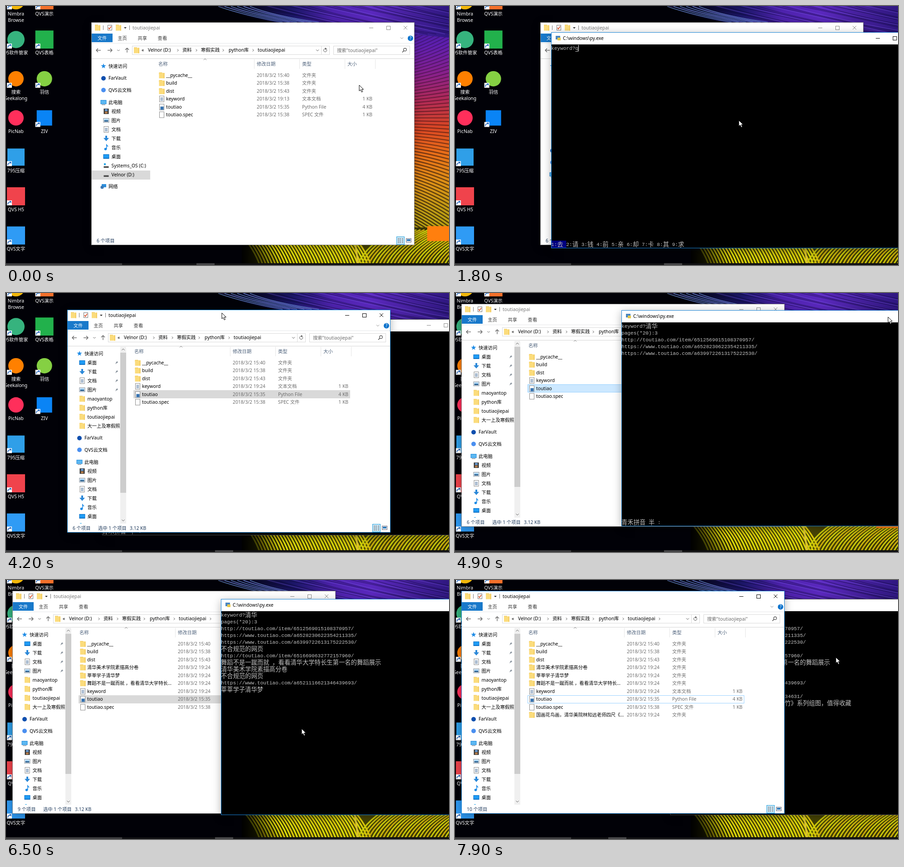
Animation of 977 by 573 pixels, one loop 8000 ms. Source, as an HTML page with a canvas:

```html
<!DOCTYPE html>
<html lang="zh-CN">
<head>
<meta charset="utf-8">
<style>
html, body { margin: 0; width: 100%; height: 100%; overflow: hidden; background: #000 }
canvas { display: block }
</style>
</head>
<body>
<canvas id="stage" width="977" height="573"></canvas>
<script>
const LOOP = 8000, STEP = 100, W = 977, H = 573;
const UI = "10.3px 'Noto Sans','Noto Sans CJK SC','Noto Sans CJK',sans-serif";
const MONO = "11.11px 'Liberation Mono',monospace";
const MONO_CJK = "300 13.33px 'Noto Sans CJK SC','Noto Sans CJK',sans-serif";
const CELL = 20 / 3;
const screen = document.getElementById('stage').getContext('2d');
let g = screen;

// ---------- helpers ----------
function rect(x, y, w, h, color) { g.fillStyle = color; g.fillRect(x, y, w, h); }
function frame(x, y, w, h, color) { g.strokeStyle = color; g.lineWidth = 1; g.strokeRect(x + .5, y + .5, w - 1, h - 1); }
function disc(x, y, r, color) { g.fillStyle = color; g.beginPath(); g.arc(x, y, r, 0, 7); g.fill(); }
function line(color, width, ...p) {
  g.strokeStyle = color; g.lineWidth = width; g.beginPath();
  for (let i = 0; i < p.length; i += 2) g.lineTo(p[i], p[i + 1]);
  g.stroke();
}
function shape(color, ...p) {
  g.fillStyle = color; g.beginPath();
  for (let i = 0; i < p.length; i += 2) g.lineTo(p[i], p[i + 1]);
  g.fill();
}
function curve(color, width, x0, y0, cx, cy, x1, y1) {
  g.strokeStyle = color; g.lineWidth = width; g.beginPath();
  g.moveTo(x0, y0); g.quadraticCurveTo(cx, cy, x1, y1); g.stroke();
}
function text(s, x, y, color = '#000', align = 'left') {
  g.font = UI; g.fillStyle = color; g.textAlign = align; g.fillText(s, x, y + 3.7);
}
function chevron(x, y, dx, dy, color = '#555') {
  if (dx) line(color, 1, x - dx, y - 2.5, x + dx, y, x - dx, y + 2.5);
  else line(color, 1, x - 3, y - dy, x, y + dy, x + 3, y - dy);
}
function gradient(x0, y0, x1, y1, colors) {
  const fill = g.createLinearGradient(x0, y0, x1, y1);
  colors.forEach((c, i) => fill.addColorStop(i / (colors.length - 1), c));
  return fill;
}
// Linear interpolation along [time, x, y] keys
function along(keys, t) {
  const i = keys.findIndex(k => k[0] > t);
  if (i === 0) return keys[0].slice(1);
  if (i < 0) return keys[keys.length - 1].slice(1);
  const [a, b] = [keys[i - 1], keys[i]], u = (t - a[0]) / (b[0] - a[0]);
  return [a[1] + (b[1] - a[1]) * u, a[2] + (b[2] - a[2]) * u];
}

// ---------- desktop ----------
function feathers() {
  // warm plume on the right, its barbs fanning out downwards
  rect(880, 30, 97, 543, gradient(900, 30, 940, H,
    ['#3c1c9c', '#5f1fae', '#86208c', '#b02a56', '#d84624', '#e87018', '#dd9016', '#c09c14', '#b0a410', '#a8a80c']));
  for (let i = 0; i < 90; i++) {
    const y = 20 + i * 6.5, slope = -70 + i * 2;
    curve(`rgba(16,4,10,${.25 + i * .006})`, 1.6 + i * .015, 885, y, 930, y + slope * .3, 985, y + slope);
  }
  // violet sweep at the top
  g.save();
  g.beginPath(); g.moveTo(465, 0); g.quadraticCurveTo(560, 44, 760, 50); g.lineTo(W, 70); g.lineTo(W, 0); g.clip();
  rect(465, 0, 512, 70, gradient(465, 0, W, 0, ['#000', '#070722', '#1c1668', '#4d22ac', '#5a28be', '#45209c', '#2f1780']));
  for (let i = 0; i < 26; i++)
    curve(i % 3 ? 'rgba(6,3,40,.4)' : 'rgba(120,90,230,.35)', 1.5, 455 + i * 18, -4, 560 + i * 18, 18 + i % 4 * 4, 740 + i * 19, 62);
  for (let i = 0; i < 6; i++) curve('rgba(120,160,240,.7)', 1.4, 468 + i * 14, 1, 530 + i * 12, 22, 610 + i * 16, 36);
  g.restore();
  // yellow plume at the bottom
  g.save();
  g.beginPath(); g.rect(520, 490, 457, 83); g.clip();
  rect(520, 490, 457, 83, gradient(520, 0, W, 0, ['#000', '#3a3a02', '#4a4804', '#403c04', '#383404']));
  for (let i = 0; i < 36; i++)
    curve(`hsl(${60 - i % 3 * 3},92%,${Math.min(45, 14 + i * 4)}%)`, 3.4, 512 + i * 7, 500, 548 + i * 7, 535, 562 + i * 7, 580);
  for (let i = 0; i < 34; i++)
    curve(`hsl(${60 - i % 4 * 3},90%,41%)`, 3.2, 772 + i * 8, 580, 790 + i * 8, 530, 860 + i * 9, 495);
  curve('#d8c030', 4, 766, 500, 773, 540, 777, 575);
  g.restore();
  rect(929, 487, 48, 33, '#ff7f0e');
}

const apps = [ // label lines, column, row, icon shape, size, colour
  ['Nimbra|Browse', 0, 0, 'disc', 40, '#f2b70a'], ['QVS演示', 1, 0, 'box', 40, '#f4702a'],
  ['95软件管家', 0, 1, 'disc', 38, '#36b37e'], ['QVS表格', 1, 1, 'box', 40, '#22b14c'],
  ['搜索|Seekalong', 0, 2, 'disc', 34, '#ff8000'], ['羽信', 1, 2, 'disc', 34, '#85d043'],
  ['PicNab', 0, 3, 'disc', 34, '#ff2f5b'], ['ZIV', 1, 3, 'box', 34, '#0a84f5'],
  ['795压缩', 0, 4, 'box', 38, '#2f9fe8'],
  ['QVS H5', 0, 5, 'box', 40, '#f0434c'],
  ['QVS文字', 0, 6, 'box', 40, '#2f9bf5']];

function desktop() {
  rect(0, 0, W, H, '#010107');
  feathers();
  for (const [label, col, row, kind, size, color] of apps) {
    const x = 22 + col * 62.7, y = -12.5 + row * 86.7;
    if (kind === 'disc') disc(x, y, size / 2, color);
    else rect(x - size / 2, y - size / 2, size, size, color);
    if (label !== 'PicNab') {
      rect(x - 20, y + 9, 11, 11, '#fff');
      line('#1b5fb8', 1.5, x - 18, y + 18, x - 17, y + 14, x - 12, y + 12.5);
      shape('#1b5fb8', x - 15, y + 10.5, x - 10.5, y + 10.5, x - 10.5, y + 15);
    }
    label.split('|').forEach((s, i) => text(s, x, y + 29.5 + i * 14.3, '#fff', 'center'));
  }
  rect(0, 569, W, 4, '#101012');
  rect(0, 569, 256, 4, '#3a3a3c');
}

// ---------- small icons, centred on x, y ----------
const icon = {
  folder(x, y) { rect(x - 6, y - 6.5, 7, 4, '#f0c552'); rect(x - 6, y - 5.5, 12, 12, '#fbdc7c'); rect(x + 4, y - 5.5, 2, 12, '#f3cc62'); },
  page(x, y) { rect(x - 5, y - 6.5, 10, 13, '#fff'); frame(x - 5.5, y - 7, 11, 14, '#8a8a8a'); },
  doc(x, y) { icon.page(x, y); for (let i = -3; i < 5; i += 2) rect(x - 3, y + i, 6, 1, '#5d7fa5'); },
  script(x, y) { icon.page(x, y); rect(x - 3, y - 1, 7, 7, '#3572b0'); },
  star(x, y) {
    g.fillStyle = '#1f8ce6'; g.beginPath();
    for (let i = 0; i < 10; i++) { const r = i % 2 ? 2.4 : 6, a = i * Math.PI / 5 - 1.57; g.lineTo(x + r * Math.cos(a), y + r * Math.sin(a)); }
    g.fill();
  },
  vault(x, y) { disc(x, y, 5, '#0f4fae'); },
  cloud(x, y) { disc(x, y, 5, '#4a8ff0'); },
  screen(x, y) { rect(x - 6.5, y - 5, 13, 9, '#1a86d8'); rect(x - 5.5, y - 4, 11, 7, '#5cb8f2'); rect(x - 4, y + 5, 8, 1, '#567'); },
  desk(x, y) { rect(x - 6.5, y - 5, 13, 10, '#0d6fc4'); rect(x - 5.5, y - 4, 11, 7, '#1f9cf5'); },
  film(x, y) { rect(x - 5.5, y - 6, 11, 12, '#333'); rect(x - 3, y - 5, 6, 4.5, '#6a9ad0'); rect(x - 3, y + .5, 6, 4.5, '#b07a4a'); },
  photo(x, y) { rect(x - 6.5, y - 5, 13, 10, '#fff'); frame(x - 6.5, y - 5, 13, 10, '#7f8c99'); rect(x - 4.5, y - 3, 9, 3, '#9fd0f5'); rect(x - 4.5, y, 9, 3, '#2d618f'); },
  down(x, y) { rect(x - 2, y - 6, 4, 6, '#2b88d8'); shape('#2b88d8', x - 6, y - 1, x + 6, y - 1, x, y + 6); },
  note(x, y) { disc(x - 1.5, y + 3.5, 2.8, '#1f8ce6'); line('#1f8ce6', 1.6, x + .8, y + 3, x + .8, y - 6, x + 4, y - 2); },
  drive(x, y) { rect(x - 5.5, y + 1.5, 11, 3.5, '#4a4a4a'); },
  system(x, y) { icon.drive(x, y); rect(x - 5, y - 5, 4, 4, '#25a5e8'); },
  net(x, y) { rect(x - 4, y - 5, 10, 7, '#2d8fdc'); disc(x - 3, y + 2, 3.6, '#3b78b5'); }
};

function windowButtons(x, y, gap, color) {
  line(color, 1, x - 4, y + .5, x + 5, y + .5);
  frame(x + gap - 4, y - 4, 9, 9, color);
  line(color, 1, x + 2 * gap - 4, y - 4, x + 2 * gap + 4, y + 4);
  line(color, 1, x + 2 * gap + 4, y - 4, x + 2 * gap - 4, y + 4);
}
function windowBase(w, h, color) {
  g.save();
  g.shadowColor = 'rgba(0,0,0,.3)'; g.shadowBlur = 18; g.shadowOffsetY = 4;
  rect(0, 0, w, h, color);
  g.restore();
}

// ---------- file manager ----------
const EW = 713, EH = 493;
const drives = [['screen', '此电脑'], ['film', ' 视频'], ['photo', ' 图片'], ['doc', ' 文档'], ['down', ' 下载'], ['note', ' 音乐'],
  ['desk', ' 桌面'], ['system', ' Systems_OS (C:)'], ['drive', ' Velnor (D:)'], ['net', '网络']];
const clouds = [['vault', 'FarVault'], ['cloud', 'QVS云文档']];
const pinned = [['desk', ' 桌面'], ['down', ' 下载'], ['doc', ' 文档'], ['photo', ' 图片'], ['folder', ' maoyantop'],
  ['folder', ' python库'], ['folder', ' toutiaojiepai'], ['folder', ' 大一上及寒假照片']];

function fileList(t) {
  const folder = (name, time) => ['folder', name, time, '文件夹', ''];
  const list = [folder('__pycache__', '15:40'), folder('build', '15:38'), folder('dist', '15:43')];
  if (t >= 5700) list.push(...['清华美术学院素描高分卷', '莘莘学子清华梦', '舞蹈不是一蹴而就 ，看看清华大学特长...'].map(n => folder(n, '19:24')));
  list.push(['doc', 'keyword', t < 2400 ? '19:13' : '19:24', '文本文档', '1 KB'],
    ['script', 'toutiao', '15:35', 'Python File', '4 KB'], ['page', 'toutiao.spec', '15:38', 'SPEC 文件', '1 KB']);
  if (t >= 7600) list.push(folder('国画花鸟画，清华美院林知远老师四尺《...', '19:24'));
  return list;
}

function sidebar(expanded) {
  g.save();
  g.beginPath(); g.rect(0, 82, expanded ? 117 : 150, 391); g.clip();
  const items = [['star', '快速访问'], ...(expanded ? pinned : []), ...clouds, ...drives];
  let y = 97;
  items.forEach(([kind, name], i) => {
    const child = name[0] === ' ';
    if (i) y += child ? 20 : 26.6;
    if (!expanded && name === ' Velnor (D:)') rect(0, Math.round(y) - 9, 130, 20, '#d9d9d9');
    icon[kind](child ? 33 : 27, Math.round(y));
    text(name.trim(), child ? 44.5 : 38, y);
    if (expanded && i > 0 && i < 5) { line('#8a949e', 1, 106, y + 3, 109, y); line('#8a949e', 3, 108, y + 1, 111, y - 2); }
  });
  g.restore();
  if (expanded) {
    rect(117, 82, 13, 391, '#f0f0f0');
    rect(117, 95, 13, 310, '#cdcdcd');
    chevron(123.5, 88, 0, -1.5); chevron(123.5, 466, 0, 1.5);
  }
}

function explorer(x, y, t, active) {
  g.save();
  g.translate(Math.round(x), Math.round(y));
  windowBase(EW, EH, '#fff');
  // title bar
  icon.folder(14, 12); icon.folder(60, 12);
  line('#777', 1, 26.5, 7, 26.5, 17); line('#777', 1, 84.5, 7, 84.5, 17);
  frame(36, 6, 10, 12, '#777'); line('#d8451e', 1.5, 38, 12, 40, 15, 44, 9);
  shape('#222', 72, 11, 78, 11, 75, 14);
  text('toutiaojiepai', 91, 12, active ? '#000' : '#777');
  windowButtons(617, 12, 38, active ? '#000' : '#8a8a8a');
  // ribbon
  rect(0, 25, 47, 19, '#1979ca');
  text('文件', 24, 35, '#fff', 'center');
  ['主页', '共享', '查看'].forEach((s, i) => text(s, 68.5 + i * 44.2, 35, '#333', 'center'));
  chevron(685, 35, 0, 1.5, '#888'); disc(704, 35.5, 6, '#0b72cc'); text('?', 704, 35.5, '#fff', 'center');
  rect(0, 46, EW, 1, '#e4e6e8');
  // address row
  line('#555', 1.2, 21, 62, 11, 62); line('#555', 1.2, 15, 58, 11, 62, 15, 66);
  line('#555', 1.2, 36, 62, 46, 62); line('#555', 1.2, 42, 58, 46, 62, 42, 66);
  chevron(60, 62, 0, 1, '#777');
  line('#555', 1.2, 79, 67, 79, 57); line('#555', 1.2, 75, 61, 79, 57, 83, 61);
  frame(90, 52, 436, 20, '#d9d9d9'); rect(507, 52, 1, 20, '#d9d9d9');
  icon.folder(100, 62);
  text('«', 111, 61);
  [['Velnor (D:)', 125], ['资料', 201], ['寒假实践', 242], ['python库', 303], ['toutiaojiepai', 367]].forEach(([s, px]) => text(s, px, 61.5));
  [191, 232, 291, 357].forEach(px => chevron(px, 62, 1.3, 0));
  if (t >= 4500) chevron(437, 62, 1.3, 0);
  chevron(499, 62, 0, 1.5);
  g.strokeStyle = '#555'; g.beginPath(); g.arc(516, 62, 3.5, -.6, 4.7); g.stroke();
  shape('#555', 516, 56, 519.5, 58.5, 516, 61);
  frame(534, 52, 169, 20, '#d9d9d9');
  text('搜索"toutiaojiepai"', 542, 62, '#6d6d6d');
  g.strokeStyle = '#444'; g.lineWidth = 1.2; g.beginPath(); g.arc(692, 60.5, 3.2, 0, 7); g.stroke();
  line('#444', 1.5, 689.5, 63, 686, 66.5);
  rect(0, 80, EW, 1, '#d5d5d5');
  sidebar(t >= 1500);
  // columns
  chevron(251, 82, 0, -1.5, '#777');
  [['名称', 148], ['修改日期', 365], ['类型', 465], ['大小', 565]].forEach(([s, px]) => text(s, px, 92, '#4c607a'));
  [359, 459, 559, 626].forEach(px => rect(px, 82, 1, 21, '#e5e5e5'));
  // rows
  const files = fileList(t), cleared = t >= 7400, selected = t >= 400 && !cleared;
  files.forEach(([kind, name, time, type, size], i) => {
    const ry = 117 + i * 17.5, top = Math.round(ry - 9);
    if (name === 'toutiao') {
      const hot = t < 600 || t >= 4400 && t < 5700;
      if (selected) rect(146, top, 478, 18, hot ? '#cce8ff' : '#d9d9d9');
      if (cleared || selected && hot) frame(146, top, 478, 18, '#99d1ff');
      else if (t >= 300 && t < 400) rect(146, top, 478, 18, '#e5f3ff');
    }
    icon[kind](155.5, Math.floor(ry) + .5);
    text(name, 165, ry);
    text('2018/3/2 ' + time, 365, ry, '#6d6d6d');
    text(type, 465, ry, '#6d6d6d');
    text(size, 620, ry, '#6d6d6d', 'right');
  });
  // status bar
  text(files.length + ' 个项目', 12, 483, '#1e395b');
  if (selected) { text('选中 1 个项目', 68, 483, '#1e395b'); text('3.12 KB', 138, 483, '#1e395b'); }
  rect(673, 474, 18, 18, '#cce8f8'); frame(673, 474, 18, 18, '#26a0da');
  for (let i = 0; i < 4; i++) for (const px of [676, 680, 685]) rect(px, 478 + i * 3, 3, 1, '#555');
  frame(694, 478, 12, 9, '#667'); rect(696, 480, 8, 4, '#2d78b8');
  frame(0, 0, EW, EH, active ? '#1883d7' : '#8c8c8c');
  g.restore();
}

// ---------- console ----------
const CW = 815, CH = 478;
const bad = '不合规范的网页';
const output = [
  [4000, 'http://toutiao.com/item/6512569015108370957/'],
  [4000, 'https://www.toutiao.com/a6528230622354211335/'],
  [4000, 'https://www.toutiao.com/a6399722613175222530/'],
  [5700, bad],
  [5800, 'http://toutiao.com/item/6516690632772157960/'],
  [6000, '舞蹈不是一蹴而就 ，看看清华大学特长生第一名的舞蹈展示'],
  [6100, '清华美术学院素描高分卷'],
  [6100, bad],
  [6200, 'https://www.toutiao.com/a6521116621346439693/'],
  [6200, '莘莘学子清华梦'],
  [7600, 'http://toutiao.com/item/6526412758390834631/'],
  [7600, '国画花鸟画，清华美院林知远老师四尺《墨竹》系列组图，值得收藏']];

const candidates = words => words.split(' ').map((w, i) => `${i + 1}:${w}`).join(' ');

function mono(s, x, y) {
  g.textAlign = 'left'; g.fillStyle = '#c0c0c0';
  for (const run of s.match(/[\x20-\x7e]+|[^\x20-\x7e]+/g) || []) {
    const ascii = run.charCodeAt(0) < 127;
    g.font = ascii ? MONO : MONO_CJK;
    g.fillText(run, x, y + (ascii ? 3.5 : 4.8));
    x += g.measureText(run).width;
  }
  return x;
}

function consoleText(t) {
  const typing = t >= 1800 && t < 2300;
  const word = t < 1800 ? '' : t < 1900 ? 'q' : t < 2100 ? 'qing' : t < 2300 ? 'qinghua' : '清华';
  const lines = [];
  if (t >= 1000) lines.push('keyword?' + word);
  if (t >= 2400) lines.push('pages(*20):' + (t < 3200 ? '' : '3'));
  if (t >= 3400) lines.push(...output.filter(o => t >= o[0]).map(o => o[1]));
  let end = 0;
  lines.forEach((s, i) => end = mono(s, 0, 35 + i * 15));
  if (typing) {
    rect(8 * CELL, 42, word.length * CELL, 1, '#c0c0c0');
    rect(end, 28, 1, 14, '#fff');
  } else if (t >= 1000 && t < 3400) rect(end, 40 + (lines.length - 1) * 15, CELL, 2, '#c0c0c0');
  else if (t >= 3400 && t < 4000) rect(0, 70, CELL, 2, '#c0c0c0');
  if (typing) {
    rect(0, 461, (word === 'qinghua' ? 7 : 5) * CELL, 16, '#000080');
    mono(candidates(t < 1900 ? '去 请 钱 前 亲 却 卡 其 求' : t < 2100 ? '请 清 情 轻 青 庆 晴 氢 倾'
      : '清华 情话 青花 清化 氢化 轻滑 倾华 请画 晴花'), 0, 469);
  } else if (t >= 1200 && t < 5700) mono('青禾拼音 半 :', 0, 469);
}

function terminal(x, y, t, active) {
  g.save();
  g.translate(Math.round(x), Math.round(y));
  if (t < 800) {
    const scale = t < 700 ? .95 : .996;
    g.globalAlpha = t < 700 ? .45 : .91;
    g.translate(CW / 2, CH / 2); g.scale(scale, scale); g.translate(-CW / 2, -CH / 2);
  }
  windowBase(CW, CH, '#000');
  rect(0, 0, CW, 27, '#fff');
  rect(10, 8, 10, 8, '#4a86c0'); rect(14, 12, 7, 6, '#e8c84a');
  text('C:\\windows\\py.exe', 26, 13, active ? '#000' : '#777');
  windowButtons(720, 13, 37.5, active ? '#000' : '#8a8a8a');
  rect(800, 27, 14, CH - 28, '#f0f0f0'); rect(800, 41, 14, 14, '#cdcdcd');
  chevron(807, 34, 0, -1.5); chevron(807, CH - 8, 0, 1.5);
  consoleText(t);
  frame(0, 0, CW, CH, active ? '#1883d7' : '#555');
  g.restore();
}

// ---------- motion ----------
const explorerPath = [[3900, 188, 36], [4200, 135, 37], [4400, 14, 24]];
const terminalPath = [[800, 2, 27], [900, 3, 28], [1200, 212, 58], [4800, 212, 58], [4900, 367, 38], [5400, 474, 34],
  [5600, 474, 34], [5700, 474, 45], [5800, 474, 42]];
const pointerPath = [[0, 779, 175], [300, 420, 224], [500, 400, 222], [700, 449, 131], [900, 400, 42], [1200, 609, 72],
  [1400, 609, 72], [1600, 626, 253], [3600, 626, 253], [3800, 529, 43], [3900, 529, 43], [4200, 476, 44], [4400, 355, 31],
  [4500, 387, 37], [4600, 791, 94], [4700, 791, 94], [4800, 800, 73], [4900, 955, 53], [5400, 1062, 49], [5900, 1062, 57],
  [6000, 857, 168], [6200, 655, 310], [6400, 655, 310], [6500, 652, 329], [6700, 410, 500], [6900, 468, 342],
  [7000, 468, 342], [7200, 310, 262], [7300, 310, 262], [7900, 840, 171]];

function pointer(x, y) {
  g.save();
  g.translate(x, y);
  shape('#fff', 0, 0, 0, 13, 3, 10.3, 5.3, 15.5, 7.6, 14.5, 5.4, 9.4, 9.4, 9.4);
  g.closePath(); g.strokeStyle = '#000'; g.lineWidth = 1; g.stroke();
  g.restore();
}

const backdrop = document.createElement('canvas');
backdrop.width = W; backdrop.height = H;
g = backdrop.getContext('2d');
desktop();
g = screen;

function draw(t) {
  g.drawImage(backdrop, 0, 0);
  rect(t < 600 ? 420 : t < 7500 ? 461 : 338, 569, 40, 4, '#444446');
  const filesFront = t >= 3800 && t < 4800 || t >= 7400;
  const files = () => explorer(...along(explorerPath, t), t, filesFront || t >= 400 && t < 600);
  const shell = () => t >= 600 && terminal(...along(terminalPath, t), t, !filesFront);
  if (filesFront) { shell(); files(); } else { files(); shell(); }
  pointer(...along(pointerPath, t));
}

function tick(now) {
  draw(Math.floor(now % LOOP / STEP) * STEP);
  requestAnimationFrame(tick);
}
draw(0);
requestAnimationFrame(tick);
</script>
</body>
</html>
```
